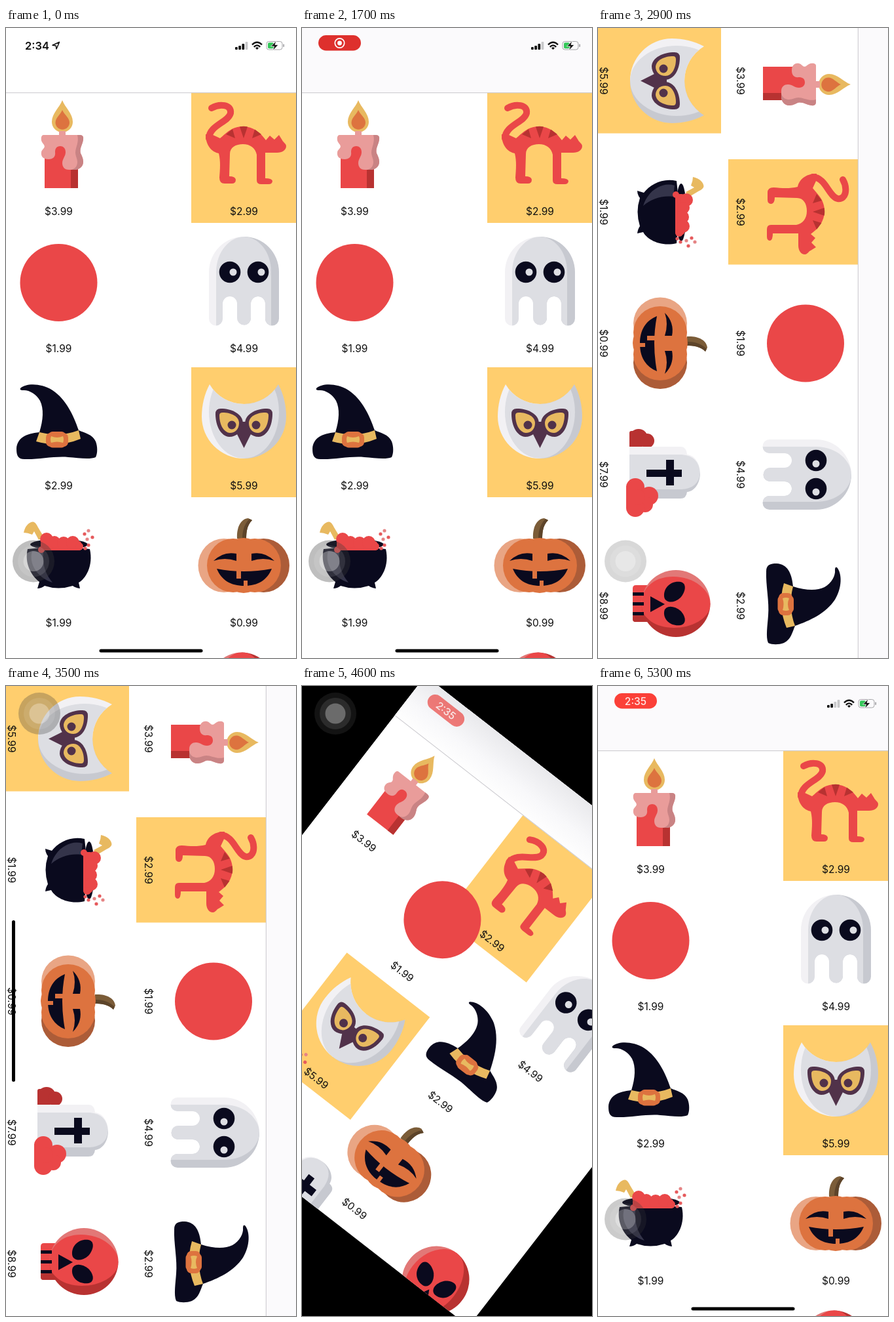
These frames come from a looping animation (443x960 px, 5.4 s). An HTML page:

```html
<!DOCTYPE html>
<html lang="en">
<head>
<meta charset="utf-8">
<title>Spooky shop rotation</title>
<style>
html, body { margin: 0; width: 100%; height: 100%; overflow: hidden; background: #000; }
#stage { display: block; width: 443px; height: 960px; }
text { font-family: Inter, Roboto, "Liberation Sans", sans-serif; fill: #111; }
.price { font-size: 15.5px; text-anchor: middle; }
.clock { font-size: 16.5px; font-weight: 600; }
</style>
</head>
<body>
<svg id="stage" viewBox="0 0 443 960"></svg>
<script>
const LOOP = 5400, STEP = 100;
const RED = '#ea4748', DEEP = '#b83231', NAVY = '#0a0a1e', GOLD = '#e8b960',
  ORANGE = '#dd733f', PALE = '#dddee3', LIGHT = '#f2f1f4', SHADE = '#c7c9d0',
  INK = '#14344f', CORAL = '#ff6b72', CYAN = '#5ce5f5', YELLOW = '#ffce6e';

const path = (d, fill, more = '') => `<path d="${d}" fill="${fill}" ${more}/>`;
const rect = (x, y, w, h, fill, r = 0) =>
  `<rect x="${x}" y="${y}" width="${w}" height="${h}" rx="${r}" fill="${fill}"/>`;
const oval = (x, y, rx, ry, fill, more = '') =>
  `<ellipse cx="${x}" cy="${y}" rx="${rx}" ry="${ry}" fill="${fill}" ${more}/>`;
const dot = (x, y, r, fill, more) => oval(x, y, r, r, fill, more);
const at = (x, y, body) => `<g transform="translate(${-x} ${-y})">${body}</g>`;
const lerp = (a, b, k) => a + (b - a) * k;

// A shape lit from the left and shaded on the right.
function lit(id, d, mid, [light, base, dark], inner) {
  return `<clipPath id="${id}"><path d="${d}"/></clipPath><g clip-path="url(#${id})">` +
    rect(mid - 200, 0, 200, 999, light) + rect(mid, 0, 200, 999, dark) + path(inner, base) + '</g>';
}
const STONE = [LIGHT, PALE, SHADE];

const candle = at(0, 99,
  path('M86 110C90 121 102 130 102 143A16 16 0 0 1 70 143C70 130 82 121 86 110Z', GOLD) +
  path('M86 125C89 132 97 137 97 144A10.5 10.5 0 0 1 75.5 144C75.5 137 83 132 86 125Z', ORANGE) +
  rect(81, 157, 10, 10, '#e99c9a') + rect(59, 170, 51, 74, RED) + rect(99, 170, 11, 74, DEEP) +
  path('M57 163H113Q119 163 118 170C117 178 112 183 114 191C117 197 118 200 118 204C118 212 111 216 105 216H96C89 216 86 211 86 206C86 199 91 196 91 189C91 183 87 180 83 180C77 180 75 184 75 189C76 196 72 200 65 200C57 200 53 196 54 189C55 184 61 183 58 178C55 174 53 172 54 166Q55 163 57 163Z', '#e99c9a') +
  path('M109 163H113Q119 163 118 170C117 178 112 183 114 191C117 197 118 200 118 204C118 212 111 216 105 216H100C107 214 109 209 109 204C109 199 106 195 106 190C106 182 112 174 109 163Z', '#c98384'));

const cat = at(283, 99,
  path('M314 122C326 115 345 116 343 130C339 144 311 148 310 168', 'none', `stroke="${RED}" stroke-width="10" stroke-linecap="round"`) +
  path('M305 162C305 180 315 189 325 191C328 203 327 215 326 228Q326 237 334 237H345Q351 237 351 231Q350 226 341 226L342 192C342 182 351 177 362 177C373 177 381 183 383 193V232Q383 238 390 238H401Q407 238 407 233Q406 229 396 229V190H414C422 190 428 186 428 180C428 176 423 174 422 171L417 163L410 170L403 164L397 171C389 160 378 150 362 150C345 150 337 160 327 168L314 162Z', RED) +
  path('M336 162L346 154L350 168ZM357 150.5Q363 149 369 150.5L363 168ZM380 154.5L390 162L376 168Z', DEEP));

const ball = dot(80.5, 80, 59, RED);

const ghost = at(283, 308,
  lit('ghost', 'M310 372A53.5 54 0 0 1 417 372V443A10 10 0 0 1 396 443V420A11 11 0 0 0 374 420V442A10.5 10.5 0 0 1 353 442V420A11 11 0 0 0 331 420V443A10.5 10.5 0 0 1 310 443Z',
    363.5, STONE, 'M321 454V372C321 340 343 318 363 318C385 318 405 340 405 372V454Z') +
  [342, 385].map(x => dot(x, 372, 16.3, NAVY) + dot(x + 5, 372, 5.5, PALE)).join(''));

const hat = at(0, 517,
  path('M22 549C31 541 53 541 71 552C92 566 103 590 111 613C120 617 132 619 137 630C140 638 140 648 137 654C128 658 110 655 95 654C75 652 48 658 28 657C18 657 16 651 16 641C17 625 30 618 51 616C57 597 58 580 52 568C46 557 34 551 26 552C22 552 21 551 22 549Z', NAVY) +
  path('M51 616Q82 624 111 613L114 626Q80 640 46 630Z', GOLD) +
  rect(61, 617, 15, 21, ORANGE, 7) + rect(80, 617, 15, 21, ORANGE, 7) + rect(65, 615, 26, 24.5, ORANGE, 6) +
  path('M69 622Q78 626 87 622Q89 627 87 632Q78 629 69 632Q67 627 69 622Z', GOLD));

const owlEye = 'M362 603C361 615 352 623 341 623C328 622 320 606 320 588Q320 580 328 580C345 580 362 588 362 603Z';
const owlIris = 'M356 602C356 611 350 617 342 617C332 616 326 604 326 590Q326 586 331 586C344 586 356 592 356 602Z';
const owlSide = path(owlEye, '#51324a') + path(owlIris, GOLD) + dot(345, 605, 6.5, '#51324a');
const owl = at(283, 517,
  lit('owl', 'M311 543A61 61 0 0 0 416 543C424 558 428 575 428 592A64.5 64 0 0 1 299 592C299 575 303 558 311 543Z',
    363.5, STONE, 'M310 585A53.5 71 0 0 1 417 585A53.5 71 0 0 1 310 585Z') +
  owlSide + `<g transform="matrix(-1 0 0 1 727 0)">${owlSide}</g>` +
  path('M352 617L361 600H366L375 617L363.5 640Z', '#51324a'));

const bubbles = [[62, 779, 10], [74, 783, 9], [88, 785, 10], [102, 784, 10], [112, 790, 6], [54, 795, 5]];
const drops = [[126, 766], [120, 771], [132, 776], [124, 779], [121, 793], [126, 788]];
const cauldron = at(0, 726,
  path('M27 769C29 759 35 753 41 752.5C45 753 47 757 49 761L58 776L50 780L43 767L40 772Q33 769 27 769Z', GOLD) +
  oval(81, 787, 44, 8, NAVY) +
  path('M33 794Q81 788 128 794C134 820 121 840 111 845L113 854Q106 853 102 850Q80 857 59 850Q54 854 48 854L51 844C38 834 28 815 33 794Z', NAVY) +
  path('M40 797C34 816 48 838 71 845C61 833 55 818 57 799Z', '#34344a') +
  rect(53, 782, 62, 14, RED, 4) + bubbles.map(b => dot(...b, RED)).join('') +
  drops.map(([x, y], i) => dot(x, y, 2.6, i % 3 ? '#e65a5c' : '#e58485')).join(''));

const grin = 'M317 812Q332 797 352 801V812Q334 806 317 812Z';
const pumpkin = at(283, 726,
  path('M353 778C352 762 358 748 370 747L376 750C368 758 367 768 367 779Z', '#7b5c38') +
  path('M376 750C368 758 367 768 367 779H361C361 766 364 756 372 748Z', '#5d442a') +
  oval(333, 819, 39.5, 41, '#e9a584') + oval(393.5, 819, 39.5, 41, '#ac5c38') +
  oval(347, 819, 40, 41, ORANGE) + oval(380, 819, 40, 41, ORANGE) + oval(363, 819, 36, 42, ORANGE) +
  path(grin, NAVY) + `<g transform="matrix(-1 0 0 1 727 0)">${path(grin, NAVY)}</g>` +
  path('M322 824Q363 832 406 824C399 841 385 850 364 850C343 850 329 841 322 824Z', NAVY) +
  rect(352, 827, 7, 12, ORANGE) + rect(363, 842, 6, 9, ORANGE));

const tomb =
  [[25, 126, 14], [29, 113, 11]].map(b => dot(...b, DEEP)).join('') + rect(14, 126, 29, 14, DEEP, 3) +
  lit('tomb', 'M38 140V62Q38 53 50 52C51 40 64 32 78 32C93 32 106 40 107 52Q117 53 117 62V140Z',
    78, STONE, 'M50 140V60Q52 34 78 32Q101 34 103 60V140Z') +
  rect(73, 60, 11, 54, NAVY) + rect(58, 72, 39, 12, NAVY) +
  [[100, 131, 14], [113, 110, 14], [126, 116, 12], [131, 131, 14], [115, 128, 12]].map(b => dot(...b, RED)).join('') +
  rect(98, 132, 34, 13, RED);

const skull =
  path('M49 98H105V130Q105 135 100 135H54Q49 135 49 130Z', RED) + rect(94, 108, 11, 27, DEEP, 4) +
  lit('skull', 'M26 69A51 52.5 0 0 1 128 69A51 52.5 0 0 1 26 69Z', 77,
    ['#e27877', RED, DEEP], 'M36 73C36 42 56 16 79 16C101 18 114 46 114 72C114 100 99 122 78 122C55 122 36 104 36 73Z') +
  path('M44 62C46 52 59 54 68 62C78 73 76 86 66 87C53 88 42 77 44 62Z', NAVY) +
  path('M110 62C108 52 96 54 88 62C79 73 80 86 90 87C102 88 112 77 110 62Z', NAVY) +
  path('M78 86L90 108H66Z', NAVY) + [60, 75, 90].map(x => rect(x, 118, 5, 17, NAVY)).join('');

const outlined = body =>
  `<g stroke="${INK}" stroke-width="7" stroke-linejoin="round" stroke-linecap="round">${body}</g>`;
const steam = x => [0, 13, 26].map(dx => path(`M${x + dx} 34q-6-9 0-16t0-14`, 'none')).join('');
const shades = outlined(path('M30 72L2 66L4 46M142 72L147 54L136 40M76 78Q85 68 95 78', 'none') +
  path('M28 68L76 72C80 96 68 110 50 110C32 108 24 92 28 68Z', CORAL) +
  path('M95 72L144 68C148 92 140 108 122 110C104 110 92 96 95 72Z', CYAN));
const iceLolly = outlined(rect(71, 108, 18, 36, '#fff', 9) +
  path('M51 108V50A29 29 0 0 1 109 50V108Q109 114 103 114H57Q51 114 51 108Z', CORAL) +
  path('M51 100H109V108Q109 114 103 114H57Q51 114 51 108Z', CYAN) + path('M66 54V78', 'none'));
const pipe = outlined(steam(48) +
  path('M24 66H92V92C108 100 114 70 114 44H138C140 88 122 142 74 142C40 142 24 122 24 94Z', CORAL) +
  path('M114 48L118 24H142L138 48Z', CYAN) + rect(18, 60, 80, 14, '#fff', 5));
const coffee = outlined(steam(70) + path('M44 62H118L108 144H54Z', CORAL) + path('M47 84H115L111 120H51Z', CYAN) +
  rect(36, 46, 90, 18, '#fff', 6) + dot(81, 102, 21, '#fff') + path('M18 144H36M126 144H140', 'none'));
const scooter = outlined(path('M42 40L58 54M118 40L102 54', 'none') +
  dot(38, 30, 13, '#fff') + dot(122, 30, 13, '#fff') + rect(69, 104, 22, 40, CYAN, 10) +
  path('M56 48Q80 34 104 48L118 106Q108 122 80 122Q52 122 42 106Z', CORAL) +
  dot(80, 48, 13, '#fff') + path('M64 84L80 126L96 84Z', CYAN));
const disc = outlined(dot(80, 80, 30, GOLD));

const items = [[candle, 3.99], [cat, 2.99], [ball, 1.99], [ghost, 4.99], [hat, 2.99],
  [owl, 5.99], [cauldron, 1.99], [pumpkin, 0.99], [tomb, 7.99], [skull, 8.99]];

// Cells that fly through while turning: icon, price, x, y, label shift, fill.
const MID = 0.311;
const extras = [[shades, '$3.99', 88, 358, 28], [iceLolly, '$4.99', 172, 361, 4],
  [pipe, '$6.99', 253, 363, 26], [coffee, '$3.99', 297, 295, 20, YELLOW],
  [scooter, '$9.99', 340, 363, 22], [disc, '', 482, 254, 0]];

const cells = items.map(([icon, price], i) => `<g class="cell">` +
  (i === 1 || i === 5 ? rect(0, 0, 160.5, 198, YELLOW) : '') + icon +
  `<text class="price" x="80.5" y="185.5">$${price}</text></g>`).join('');

const guests = extras.map(([icon, price, , , , fill]) => `<svg class="guest" overflow="hidden">` +
  (fill ? rect(0, 0, 400, 400, fill) : '') + `<g>${icon}</g><text class="price">${price}</text></svg>`).join('');

const status =
  `<g id="idle"><text class="clock" x="29" y="33">2:34</text>` +
  path('M81.5 21.5L71 26.3L76.3 27L77 32Z', 'none', 'stroke="#111" stroke-width="1.5" stroke-linejoin="round"') + '</g>' +
  `<g id="pill"><rect id="pillBox" x="25" y="11" width="65" height="23.5" rx="11.75"/>` +
  `<g id="rec">${dot(57.5, 23, 7.2, 'none', 'stroke="#fff" stroke-width="1.7"')}${dot(57.5, 23, 3.4, '#fff')}</g>` +
  `<text id="later" class="clock" x="57.5" y="28.5" text-anchor="middle" style="font-size:15.5px;font-weight:500;fill:#ffe8e6">2:35</text></g>` +
  [4, 6, 9, 12].map((h, i) => `<rect class="bar" x="${350 + i * 5.2}" y="${33 - h}" width="3.8" height="${h}" rx="1"/>`).join('') +
  `<g fill="none" stroke="#111" stroke-width="2.4"><path d="M376 25.5Q383.5 18 391 25.5M378.8 28.8Q383.5 24 388.2 28.8"/></g>` +
  path('M383.5 33L381 30.5Q383.5 28 386 30.5Z', '#111') +
  `<rect x="398" y="20.5" width="24" height="12.5" rx="3.5" fill="none" stroke="#a5a5a8"/>` +
  rect(400, 22.3, 9, 9, '#34c759', 2) + rect(423.3, 24.5, 1.8, 4.5, '#a5a5a8', 1) +
  path('M413 19.5L404.5 28H409.5L407.5 34.5L416 25.5H411Z', '#111', 'stroke="#fff" stroke-width=".8"');

const stage = document.getElementById('stage');
stage.innerHTML = `
  <defs><linearGradient id="haze" x2="0" y2="1"><stop stop-color="#e9e9ec"/><stop offset=".6" stop-color="#f8f8fa"/><stop offset="1" stop-color="#fefefe"/></linearGradient></defs>
  <g id="turn"><svg id="page" overflow="hidden"><rect width="960" height="960" fill="#fff"/>${cells}${guests}
    <rect id="head" width="960"/><rect id="rule" width="960" height="1" fill="#c9c8cd"/>
    <g id="status">${status}</g><rect id="home" height="5" rx="2.5"/></svg></g>
  <g id="touch">${dot(0, 0, 32, '#3c3c3c', 'opacity=".33"')}${dot(0, 0, 24, '#fff', 'opacity=".1"')}${dot(0, 0, 15.5, '#fff', 'opacity=".3"')}</g>`;

const $ = id => document.getElementById(id);
const set = (el, attrs) => { for (const k in attrs) el.setAttribute(k, attrs[k]); };
const show = (el, on) => el.style.display = on ? '' : 'none';
const cellEls = [...document.querySelectorAll('.cell')];
const guestEls = [...document.querySelectorAll('.guest')];
const bars = document.querySelectorAll('.bar');

const clamp = k => Math.min(1, Math.max(0, k));
const ramp = (t, a, b) => clamp((t - a) / (b - a));
const ease = k => k * k * (3 - 2 * k);

function draw(t) {
  const p = ease(ramp(t, 2589, 2889)) - ease(ramp(t, 4434, 4734));
  const w = lerp(443, 960, p), h = lerp(960, 443, p), top = lerp(99, 46, p);
  const turning = p > 0 && p < 1;
  set($('turn'), { transform: `translate(221.5 480) rotate(${90 * p}) translate(${-w / 2} ${-h / 2})` });
  set($('page'), { width: w, height: h });

  cellEls.forEach((el, i) => {
    const x = lerp(i % 2 * 283, i % 5 * 200, p);
    const y = top + 209 * lerp(i >> 1, Math.floor(i / 5), p);
    set(el, { transform: `translate(${x} ${y})` });
  });

  const k = (p - MID) / (1 - MID), size = 0.5 + 0.5 * k;
  guestEls.forEach((el, i) => {
    const [, , cx, cy, shift] = extras[i];
    show(el, turning && t < 3000);
    const x = lerp(cx, 80 + 200 * i, k), y = lerp(cy, 552, k);
    set(el, { x: x - 80 * size, y: y - 88 * size, width: 160 * size, height: 224 * size });
    set(el.children[el.children.length - 2], { transform: `translate(0 ${8 * size}) scale(${size})` });
    set(el.lastChild, { x: 80 * size + shift, y: 190 * size + 3 });
  });

  set($('head'), { height: top, fill: turning ? 'url(#haze)' : t < STEP ? '#fff' : '#fbfafc' });
  set($('rule'), { y: top - 0.8 });

  const back = t >= 3000;
  show($('status'), !p || back && p < 1);
  $('status').style.opacity = back ? 1 - 0.85 * p : 1;
  show($('idle'), t < STEP);
  show($('pill'), t >= STEP);
  show($('rec'), !back);
  show($('later'), back);
  const glow = 0.5 - 0.5 * Math.cos((t - 1700) / 2400 * 2 * Math.PI);
  set($('pillBox'), { fill: `rgb(${lerp(222, 251, glow)},${lerp(48, 64, glow)},${lerp(45, 56, glow)})` });
  bars.forEach((el, i) => set(el, { fill: i < (back ? 2 : 3) ? '#111' : '#c8c8ca' }));

  show($('home'), !p || p === 1 && t >= 3100);
  const span = p === 1 ? 246 : 158;
  set($('home'), { x: w / 2 - span / 2, y: p === 1 ? 429 : 946.5, width: span });

  const side = t >= 3150 && t < 4900;
  const alpha = t < 3150 ? 1 - ramp(t, 2700, 3150) * 0.9
    : side ? ramp(t, 3150, 3550) - ramp(t, 4600, 4900) : ramp(t, 4900, 5400);
  set($('touch'), { transform: side ? 'translate(51 42)' : 'translate(42 812.5)', opacity: alpha });
}

const start = performance.now();
function tick() {
  const t = (performance.now() - start) % LOOP;
  draw(Math.floor(t / STEP) * STEP);
  requestAnimationFrame(tick);
}
tick();
</script>
</body>
</html>
```
